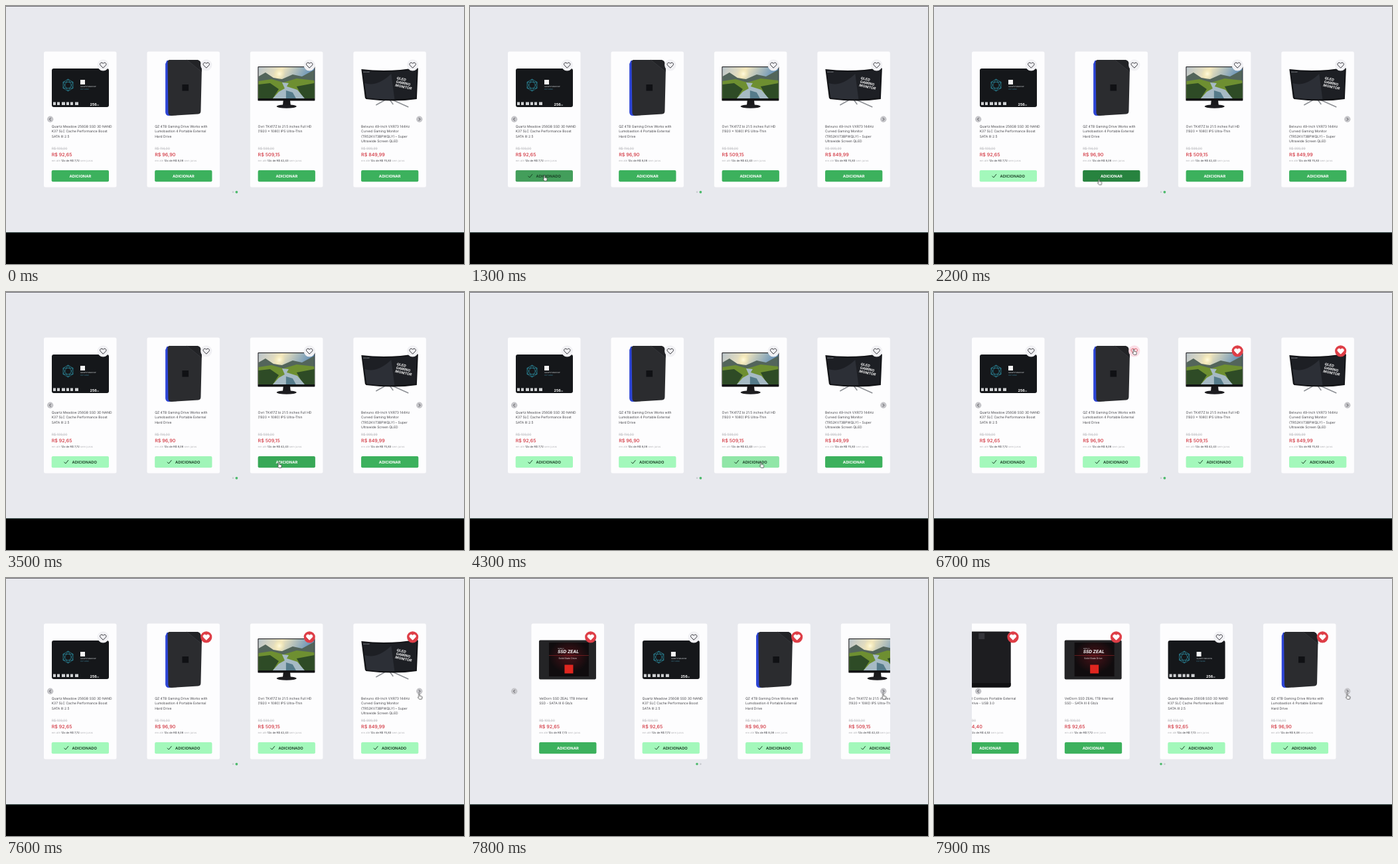
These frames come from a looping animation (690x388 px, 8000 ms). An HTML page:

```html
<!DOCTYPE html>
<html lang="pt-BR">
<head>
<meta charset="utf-8">
<title>Vitrine de produtos</title>
<style>
html, body { margin: 0; width: 100%; height: 100%; overflow: hidden; background: #000; }
svg { display: block; width: 100vw; height: 100vh; font-family: Inter, Arial, sans-serif; text-rendering: geometricPrecision; }
.name { font-size: 5.03px; fill: #45454a; }
.old { font-size: 5.03px; fill: #b9b9bd; text-decoration: line-through; }
.price { font-size: 7.15px; font-weight: 500; fill: #d23640; }
.parcel { font-size: 4.1px; fill: #b4b4b8; }
.parcel tspan { fill: #55555a; font-weight: 500; }
.label { font-size: 5.75px; font-weight: 700; fill: #fff; text-anchor: middle; }
.done { opacity: 0; }
.done text { font-size: 5.75px; font-weight: 600; fill: #173a22; }
.done path { fill: none; stroke: #173a22; stroke-width: .95; }
.button { fill: #3cb15d; }
.disc { fill: #f1f1f4; }
.heart { fill: transparent; stroke: #34343a; stroke-width: 1; stroke-linejoin: round; }
.liked .disc { fill: #de3e47; }
.liked .heart { fill: #fff; stroke: #fff; }
.arrow circle { fill: #c5c5c9; }
.arrow path { fill: none; stroke: #3d3d42; stroke-width: .9; }
.tiny { font-size: 2.6px; fill: #dfe3e6; }
#track { animation: slide 8s step-end infinite; }
#dotA { animation: dotA 8s step-end infinite; }
#dotB { animation: dotB 8s step-end infinite; }
#cursor { animation: move 8s ease-in-out infinite, show 8s step-end infinite; }
@keyframes slide {
  0% { transform: none; }
  97.5% { transform: translateX(190.9px); }
  98.75%, 100% { transform: translateX(283.6px); }
}
@keyframes dotA { 0% { fill: #c9cbd0; r: 1.3px; } 97.5%, 100% { fill: #4bb96a; r: 1.8px; } }
@keyframes dotB { 0% { fill: #4bb96a; r: 1.9px; } 97.5%, 100% { fill: #c9cbd0; r: 1.4px; } }
@keyframes show { 0% { opacity: 0; } 7.5%, 100% { opacity: 1; } }
</style>
</head>
<body>
<svg id="stage" viewBox="0 0 690 388" preserveAspectRatio="none"></svg>
<script>
const LOOP = 8000, PITCH = 155.45, LEFT = 57;

const ssd = `
  <rect x="12" y="94" width="86" height="58" rx="3" fill="#15171a"/>
  <path d="M36.5 110 44 114.5V123.5L36.5 128 29 123.5V114.5ZM36.5 110 44 123.5H29ZM36.5 128 29 114.5H44Z" fill="none" stroke="#2b8fa3" stroke-width=".7"/>
  <rect x="55" y="111" width="7" height="7" fill="#f4f4f4"/>
  <text class="tiny" x="55" y="122.4">QUARTZ MEADOW</text>
  <text class="tiny" x="55" y="126.4" style="fill:#3d7f96">K37 NAND</text>
  <path d="M14 144.5h4v4.5h-4zM20 144.5h4v4.5h-4zM27 144.5h5v4.5h-5zM34 144.5h4v4.5h-4zM40 144.5h4v4.5h-4zM47 144.5h5v4.5h-5z" fill="#cfd1d3"/>
  <text x="69.5" y="149.6" font-size="5.4" font-weight="700" fill="#fff">256</text>
  <text class="tiny" x="79.5" y="149.6">GB</text>`;

const gamingDrive = `
  <path d="M30 82 27.7 87V160Q28 165 33 165H36L37 82Z" fill="#2d45d6"/>
  <path d="M34 81H74Q80 81 81 86L82.5 94 81 158Q81 162 77 162.500L37 165Q32 165 32 160L31 85Q31 81 34 81Z" fill="#2b2c2f"/>
  <path d="M60 81H74Q80 81 81 86L82.500 99Z" fill="#222326"/>
  <path d="M60 81 82.500 99" stroke="#45464a" stroke-width=".5"/>
  <rect x="53" y="118" width="9.600" height="9.600" fill="#101114"/>`;

const monitor = `
  <path d="M50 141H60L61 150H49Z" fill="#19191b"/>
  <ellipse cx="54.800" cy="151" rx="15" ry="2.800" fill="#1d1d20"/>
  <rect x="11.500" y="91" width="86" height="51.500" rx=".8" fill="#121214"/>
  <rect x="12.500" y="92" width="84" height="47" fill="url(#sky)"/>
  <path d="M12.500 106 23 100 35 108 48 110 64 103 78 106 96.500 96V139H12.500Z" fill="#53655b"/>
  <path d="M12.500 113 32 110 50 115 70 109 96.500 112V139H12.500Z" fill="#6e8f31"/>
  <path d="M12.500 118 30 116 43 125 34 139H12.500ZM70 121 96.500 116V139H80Z" fill="#2e4b26"/>
  <path d="M48 115 58 116 55 121 71 126 82 139H34L43 129 52 124Z" fill="#a6bac4"/>
  <path d="M54 127 64 130 69 139H54Z" fill="#557b8a"/>
  <circle cx="44" cy="102" r="9" fill="url(#sun)"/>`;

const curved = `
  <path d="M52 139 34 149M54 139 83 152M54 140 60 148" fill="none" stroke="#8d9095" stroke-width="1.500"/>
  <path d="M12 95Q54 100 96 92.500L97.500 94 95.500 140Q61 145 19 140L17.500 138Z" fill="#131417"/>
  <path d="M14 97Q54 102 95.500 94.500L94 138Q60 142 20 138Z" fill="#1d1f24"/>
  <path d="M17 116Q36 122 57 102L62 140Q40 141 20 138Z" fill="#2c2f36"/>
  <text class="tiny" x="15" y="100.400" style="font-size:2px">BELVUNO</text>
  <g transform="translate(65 110) rotate(12)" font-size="5.300" font-weight="700" font-style="italic" fill="#f2f2f2">
    <text>QLED</text><text y="5.500">GAMING</text><text y="11">MONITOR</text>
  </g>`;

const redDrive = `
  <rect x="11.500" y="93.500" width="86" height="59" rx="2" fill="#242426"/>
  <rect x="26.500" y="97" width="60" height="51" fill="url(#glow)"/>
  <text class="tiny" x="39.500" y="106.500">VelDorn</text>
  <text x="39.500" y="112.600" font-size="6.600" font-weight="700" font-style="italic" fill="#fff">SSD ZEAL</text>
  <path d="M26.500 116.500H86.500" stroke="#b32b2b" stroke-width=".5"/>
  <text x="41" y="122" font-size="3.500" fill="#e5e5e5">Solid State Drive</text>
  <rect x="50" y="130.500" width="13" height="13" fill="#e0261f"/>`;

const blackDrive = `
  <rect x="24" y="80.500" width="62" height="84" rx="4" fill="#1d1d20"/>
  <path d="M24 158H86V160.500Q86 164.500 82 164.500H28Q24 164.500 24 160.500Z" fill="#111113"/>
  <rect x="37.500" y="83" width="9" height="9" fill="#35353a"/>`;

// buy and like hold [enter, click, leave] in ms
const products = [
  { slot: -2, art: blackDrive, name: ["QZ 1TB Contours Portable External", "Hard Drive - USB 3.0"], old: "64,00", price: "54,40", parcel: "4,53", liked: true },
  { slot: -1, art: redDrive, name: ["VelDorn SSD ZEAL 1TB Internal", "SSD - SATA III 6 Gb/s"], old: "109,00", price: "92,65", parcel: "7,72", liked: true },
  { slot: 0, art: ssd, name: ["Quartz Meadow 256GB SSD 3D NAND", "K37 SLC Cache Performance Boost", "SATA III 2.5"], old: "109,00", price: "92,65", parcel: "7,72", buy: [850, 1250, 1650] },
  { slot: 1, art: gamingDrive, name: ["QZ 4TB Gaming Drive Works with", "Lumobastion 4 Portable External", "Hard Drive"], old: "114,00", price: "96,90", parcel: "8,08", buy: [1880, 2600, 3270], like: [6500, 6950, 7120] },
  { slot: 2, art: monitor, name: ["Ovri TK417Z bi 21.5 inches Full HD", "(1920 × 1080) IPS Ultra-Thin"], old: "599,00", price: "509,15", parcel: "42,43", buy: [3450, 3850, 4300], like: [5980, 6230, 6400] },
  { slot: 3, art: curved, name: ["Belvuno 49-Inch VXR73 144Hz", "Curved Gaming Monitor", "(TR52KV73BPWQLY) – Super", "Ultrawide Screen QLED"], old: "999,99", price: "849,99", parcel: "70,83", buy: [4450, 4730, 4960], like: [4990, 5500, 5720] },
];

const path = [
  [600, 150, 236], [900, 112, 254], [1550, 112, 255], [2000, 240, 259], [2200, 248.5, 260.5],
  [2900, 250, 259], [3200, 264, 258], [3500, 411, 256], [4200, 413, 256], [4550, 560, 256],
  [4800, 574, 255], [5080, 612, 85.5], [5650, 612, 85.5], [5900, 468, 86], [6050, 457, 86],
  [6320, 457, 86], [6620, 301, 86], [7050, 301, 86], [7500, 622.5, 174], [LOOP, 622.5, 174],
];

const rules = [];
const keyframes = (name, steps) => rules.push(
  `@keyframes ${name}{${steps.map(([ms, css]) => `${ms * 100 / LOOP}%{${css}}`).join("")}}`);
const animate = (name, steps, easing = "linear") => {
  keyframes(name, steps);
  rules.push(`#${name}{animation:${name} ${LOOP}ms ${easing} infinite}`);
};

function fade(name, [enter, click, leave], [idle, hover, active, rest], speed) {
  animate(name, [[0, idle], [enter, idle], [enter + speed, hover], [click, hover],
    [click + speed * .7, active], [Math.max(leave, click + speed * .7 + 1), active],
    [leave + speed, rest], [LOOP, rest]]);
}

function animateCard({ slot, buy, like }) {
  if (buy) {
    fade(`button${slot}`, buy, ["#3cb15d", "#27833f", "#90e6a7", "#a3f8bb"].map(c => `fill:${c}`), 270);
    animate(`label${slot}`, [[0, "opacity:1"], [buy[1], "opacity:0"], [LOOP, "opacity:0"]], "step-end");
    animate(`done${slot}`, [[0, "opacity:0"], [buy[1], "opacity:1"], [LOOP, "opacity:1"]], "step-end");
  }
  if (like) {
    const liked = "fill:#fff;stroke:#fff";
    fade(`disc${slot}`, like, ["#f1f1f4", "#fbdde5", "#de3e47", "#de3e47"].map(c => `fill:${c}`), 140);
    fade(`heart${slot}`, like, ["fill:transparent;stroke:#34343a", "fill:transparent;stroke:#dc5560", liked, liked], 140);
  }
}

const card = ({ slot, art, name, old, price, parcel, liked }) => `
  <g transform="translate(${LEFT + slot * PITCH} 0)">
    <rect y="68.5" width="109.5" height="204" rx="2.5" fill="#fdfdfe"/>
    ${art}
    <g transform="translate(89.3 88.8)" class="${liked ? "liked" : ""}">
      <circle id="disc${slot}" class="disc" r="8.6"/>
      <path id="heart${slot}" class="heart" d="M0 4.4-4 .4C-6.2-2.1-2.6-5.4 0-2.4 2.6-5.4 6.2-2.100 4 .4Z"/>
    </g>
    ${name.map((line, i) => `<text class="name" x="11.7" y="${183.2 + i * 7.2}">${line}</text>`).join("")}
    <text class="old" x="11.7" y="216.2">R$ ${old}</text>
    <text class="price" x="11.7" y="226.2">R$ ${price}</text>
    <text class="parcel" x="11.7" y="233.7">em até <tspan>12x de R$ ${parcel}</tspan> sem juros</text>
    <rect id="button${slot}" class="button" x="11.7" y="247" width="86.3" height="17.3" rx="2"/>
    <text id="label${slot}" class="label" x="54.9" y="257.7">ADICIONAR</text>
    <g id="done${slot}" class="done">
      <path d="M30.500 255.700 32.800 258 37 252.900"/>
      <text x="42.6" y="257.7">ADICIONADO</text>
    </g>
  </g>`;

const arrow = (x, side) => `
  <g class="arrow" transform="translate(${x} 170.3) scale(${side} 1)">
    <circle r="4.7"/><path d="M-.9-2.100 1.200 0-.9 2.100"/>
  </g>`;

products.forEach(animateCard);
const at = (x, y) => `transform:translate(${x}px,${y}px)`;
keyframes("move", [[0, at(150, 236)], ...path.map(([ms, x, y]) => [ms, at(x, y)])]);

document.getElementById("stage").innerHTML = `
  <style>${rules.join("\n")}</style>
  <defs>
    <clipPath id="window"><rect x="${LEFT}" y="60" width="575.5" height="220"/></clipPath>
    <linearGradient id="sky" x2="1" y2=".3"><stop stop-color="#b9c3c9"/><stop offset=".4" stop-color="#f0e5bd"/><stop offset="1" stop-color="#4f83b8"/></linearGradient>
    <radialGradient id="sun"><stop stop-color="#fffbe0"/><stop offset="1" stop-color="#fbe9a0" stop-opacity="0"/></radialGradient>
    <radialGradient id="glow" cy=".4"><stop stop-color="#4a1218"/><stop offset="1" stop-color="#100c0e"/></radialGradient>
  </defs>
  <rect width="690" height="340.5" fill="#e8e9ee"/>
  <rect width="690" height="1" fill="#6d6d73"/>
  <rect y="340" width="690" height=".7" fill="#4d6a65"/>
  <g clip-path="url(#window)"><g id="track">${products.map(card).join("")}</g></g>
  ${arrow(66.7, -1)}${arrow(622.8, 1)}
  <circle id="dotA" cx="342" cy="279.8" r="1.3"/>
  <circle id="dotB" cx="347.4" cy="279.8" r="1.9"/>
  <g id="cursor">
    <path transform="translate(-2.1 0)" d="M1.300.7A.8.8 0 0 1 2.900.7V3.300L5.500 3.900Q6.400 4.200 6.300 5.100L5.800 8.300H2.200L0 5.600Q.3 4.700 1.300 5.600Z" fill="#fff" stroke="#333" stroke-width=".7" stroke-linejoin="round"/>
  </g>`;
</script>
</body>
</html>
```
